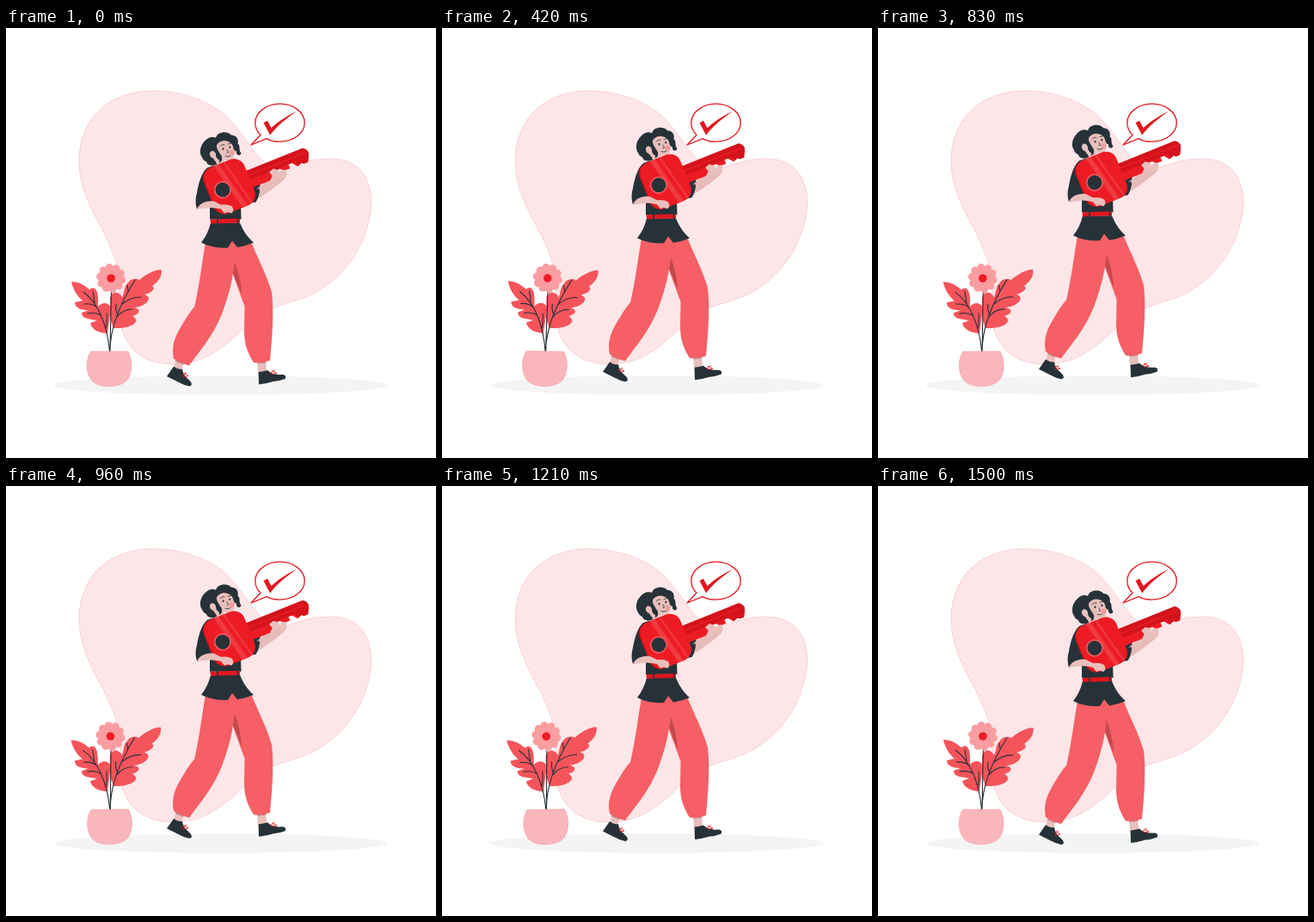
These frames come from a looping animation (500 by 500 pixels, 1.54 s). An HTML page:

```html
<!DOCTYPE html>
<html lang="en">
<head>
<meta charset="utf-8">
<title>Woman carrying a key</title>
<style>
  html, body { margin: 0; width: 100%; height: 100%; overflow: hidden; background: #fff; }
  svg { display: block; width: 100%; height: 100%; }
  .red { fill: #ed1c24; }
  .dark { fill: #263238; }
  .pants { fill: #f55f65; }
  .skin { fill: #e9bfbc; }
  .line { fill: none; stroke: #263238; stroke-linecap: round; stroke-linejoin: round; }
</style>
</head>
<body>
<svg viewBox="0 0 500 500">
  <path fill="#fce6e8" stroke="#ed1c24" stroke-opacity=".35" stroke-width=".4" d="M85 155C85 103 122 73 170 73C205 73 232 84 251 98C281 123 292 163 320 164C340 159 350 152 378 152C408 152 425 172 425 204C423 245 398 288 359 308C330 323 303 321 278 348C255 370 232 391 194 391C160 391 135 372 132 335C132 300 136 290 122 256C108 222 85 195 85 155Z"/>
  <ellipse cx="249.500" cy="415.500" rx="193.500" ry="11.300" fill="#f4f4f4"/>

  <g id="bubble">
    <path fill="#fff" stroke="#e2171f" stroke-width="1.300" stroke-linejoin="round" d="M296 124.300L285 136L303 128.600C307 131 312 132.200 318.500 132.200C334 132.200 347.200 122.500 347.200 110.200C347.200 98 334 88.200 318.500 88.200C303 88.200 289.800 98 289.800 110.200C289.800 115.600 292 120.600 296 124.300Z"/>
    <path fill="#e2171f" d="M299.500 110.300L304 107.800L308.500 116.300C315 110 326 102 338 97C326 105 315 114 307 124.500Z"/>
  </g>

  <g id="woman">
    <g id="feet">
      <path class="skin" d="M198 385L207 389L204 399L195 396ZM292 387L302 386L303 400L293 401Z"/>
      <path fill="#bd9895" d="M198 385L207 389L206 392L196.500 388ZM292 387L302 386L302.500 390L292.500 391Z"/>
      <path class="dark" d="M195 394Q201 398 205 397C206 404 210 407 214 411C217 414 216 417 213 417Q207 416 201 412.500L187 405.500ZM293.500 400.500Q299 400 304 398.500C309 403 315 404 321 403.500C325 403.500 326 406 324.500 408.500Q318 411 311 411.500Q303 414 294 415Z"/>
      <path fill="none" stroke="#ed1c24" stroke-width=".9" d="M205 404L210 401M206 406L212 405L207 402M307 402L313 398M309 403L315 402L309 399"/>
    </g>

    <g id="trousers">
      <path class="pants" d="M260 247L285 249C293 269 303 287 309 308C312 333 309 365 307 387Q298 391 288 389.500C280 377 277 366 277 353L277.500 324C270 304 264 287 258 270Z"/>
      <path fill="#c4494e" d="M264 269C268 276 273 292 274 310L263 283Z"/>
      <path class="pants" d="M232 250L267 250C267 278 262 304 251 333C241 358 226 375 213 393Q202 390 195 385C193 374 194 366 200 354C207 342 213 331 219 325C225 300 228 272 232 250Z"/>
    </g>

    <g id="head">
      <path class="skin" d="M240 143L254 150V168H238Z"/>
      <path class="skin" d="M244 138C246 129 256 126 262 131C266 136 267 143 265 149C264 155 256 156 250 152C245 149 243 144 244 138Z"/>
      <path class="dark" d="M228 151C224 145 226 137 231 132C235 127 240 126 244 128C246 121 257 119.500 262 125C267 125 271 129 269.500 135C273 137 270 142 273.500 146C272 150.500 267 148 268 144C263 143 266 138 261 134C257 131 251 130 246 135C243 139 247 143 249 147C253 151 251 157 247.500 157C250 153 245 154 244 149L241 149C239 153 245 155 245 159C241 161 234 161 233 156C230 155 229 153 228 151Z"/>
      <path class="skin" d="M244 147C242 141 236 143 237 148C238 152 242 153 244 152Z"/>
      <circle cx="262.500" cy="145.500" r="3" fill="#f58d8d" opacity=".7"/>
      <path class="dark" d="M251.500 141a1 1.400 0 1 0 2 0a1 1.400 0 1 0 -2 0M259.300 139a1 1.400 0 1 0 2 0a1 1.400 0 1 0 -2 0"/>
      <path class="line" stroke-width=".8" d="M249 138Q251 135 254 136M258 135.500L261.500 134.500M257 142L258.500 145L257 145.500M255 149.500Q258 151 261 149"/>
    </g>

    <g id="shirt">
      <path class="dark" d="M234 163Q245 158 257 162L286 183L295.500 182Q296 195 290.500 203L273 206L273.500 223H237V206L222 211C220 205 220 199 222 192C224 181 227 169 234 163Z"/>
      <path class="dark" d="M238 227H272C276 237 281 244 288 250Q279 254 269 255.500L263 248L258 256Q240 257 227 250Q235 240 238 227Z"/>
      <path fill="#e0161e" d="M237.500 223L272 222V227L238 228Z"/>
      <path class="line" stroke-width="1.500" d="M246 222V229M269.500 221V228"/>
    </g>

    <path id="far-arm" fill="#e7bbb8" d="M291 188L310 173L325 166Q328 171 324 176C316 183 306 191 293 199Q296 194 294.500 187Z"/>

    <g id="key" transform="translate(260 184.500) rotate(-22)">
      <path class="red" d="M20 -5H96L99 1L95 8H90L88 6L82 8L77 2H73V7H66L62 3H58V7H51L46 11.500H20Z"/>
      <path fill="#d3131b" d="M20 -9.500H95Q99 -8 100 -2L98 2H20Z"/>
      <path fill="none" stroke="#ed1c24" stroke-width="1.300" d="M20 -3.500H96"/>
      <path fill="#d3131b" d="M82 2H98L95 8H90L88 6L82 8Z"/>
      <rect x="-26" y="-28.500" width="50" height="57" rx="13" fill="#d3131b"/>
      <rect x="-24.500" y="-28.500" width="49.500" height="57" rx="13" class="red"/>
      <path fill="#f34a50" opacity=".65" d="M-8 -28.500H-2L11 28.500H5ZM3 -28.500H5L18 27H16Z"/>
      <circle cx="-9" cy=".7" r="10.200" fill="#f3565d"/>
      <circle cx="-9" cy=".7" r="8.400" class="dark"/>
    </g>

    <path class="skin" d="M306 168L311 164L317 166L319 172L312 178L309 180Q306 177 311 174ZM319 167L325 165Q328 170 324 174L318 175Z"/>
    <path class="skin" d="M222 211C225 204 233 200.500 242 202L250 206Q258 205 263 208Q266 213 262 216L258 214.500L254 216L250 211Q240 208.500 232 210Z"/>
  </g>

  <g id="plant">
    <path fill="#f5545b" d="M76 295C85 295 91 299 97 304C104 299 108 305 107 324C112 318 120 319 122 326L118 355C108 355 99 350 98 343L106 340C98 338 88 339 88 331L96 328C86 328 80 325 80 319L89 317C82 311 78 304 76 295Z"/>
    <path fill="#f5545b" d="M180.500 281C182 289 176 296 170 300C175 303 169 308 161 310C172 313 163 324 149 325C159 328 154 333 147 335C158 341 146 350 125 349L121 338V314C123 305 132 306 135 313C138 308 136 302 142 296C145 291 152 291 155 293C162 287 172 281 180.500 281Z"/>
    <path class="line" stroke-width="1.100" d="M120.500 376C118 347 108 320 90 307M121 376C121 345 136 315 150 293M121 376L122.500 303M103 320L101 306M110 334Q104 330 95 332M106 325Q100 320 91 321M116 350Q118 340 117 332M135 321Q146 312 157 313M129 336Q136 327 147 327M130 334Q127 328 128 321M142 306L141 299"/>
    <g id="petals" fill="#fa9da1"><circle cx="122" cy="291" r="11"/></g>
    <circle class="red" cx="122" cy="291" r="4.800"/>
    <path fill="#f9b7bb" stroke="#f58a90" stroke-width=".4" d="M98.500 376H142C147 385 148 398 142 408C135 419 107 420 99 409C92 399 93 385 98.500 376Z"/>
  </g>
</svg>
<script>
  const PERIOD = 1540, LEAD = 30, PETALS = 10;
  const byId = id => document.getElementById(id);
  const woman = byId('woman'), plant = byId('plant'), petals = byId('petals');

  for (let i = 0; i < PETALS; i++) {
    const petal = petals.firstChild.cloneNode();
    const angle = (i + 0.25) / PETALS * 2 * Math.PI;
    petal.setAttribute('cx', 122 + 12.5 * Math.cos(angle));
    petal.setAttribute('cy', 291 + 12.5 * Math.sin(angle));
    petal.setAttribute('r', 4.6);
    petals.append(petal);
  }

  // Linear triangle wave: 0, 1, 0, -1, 0 over one phase
  const sway = p => p < 0.25 ? 4 * p : p < 0.75 ? 2 - 4 * p : 4 * p - 4;

  function draw() {
    const phase = (performance.now() + LEAD) % PERIOD / PERIOD;
    const lift = 10 * (1 - Math.abs(1 - 2 * phase));
    woman.setAttribute('transform', `translate(0 ${-lift})`);
    plant.setAttribute('transform', `rotate(${sway(phase)} 128 346)`);
    requestAnimationFrame(draw);
  }
  draw();
</script>
</body>
</html>
```
